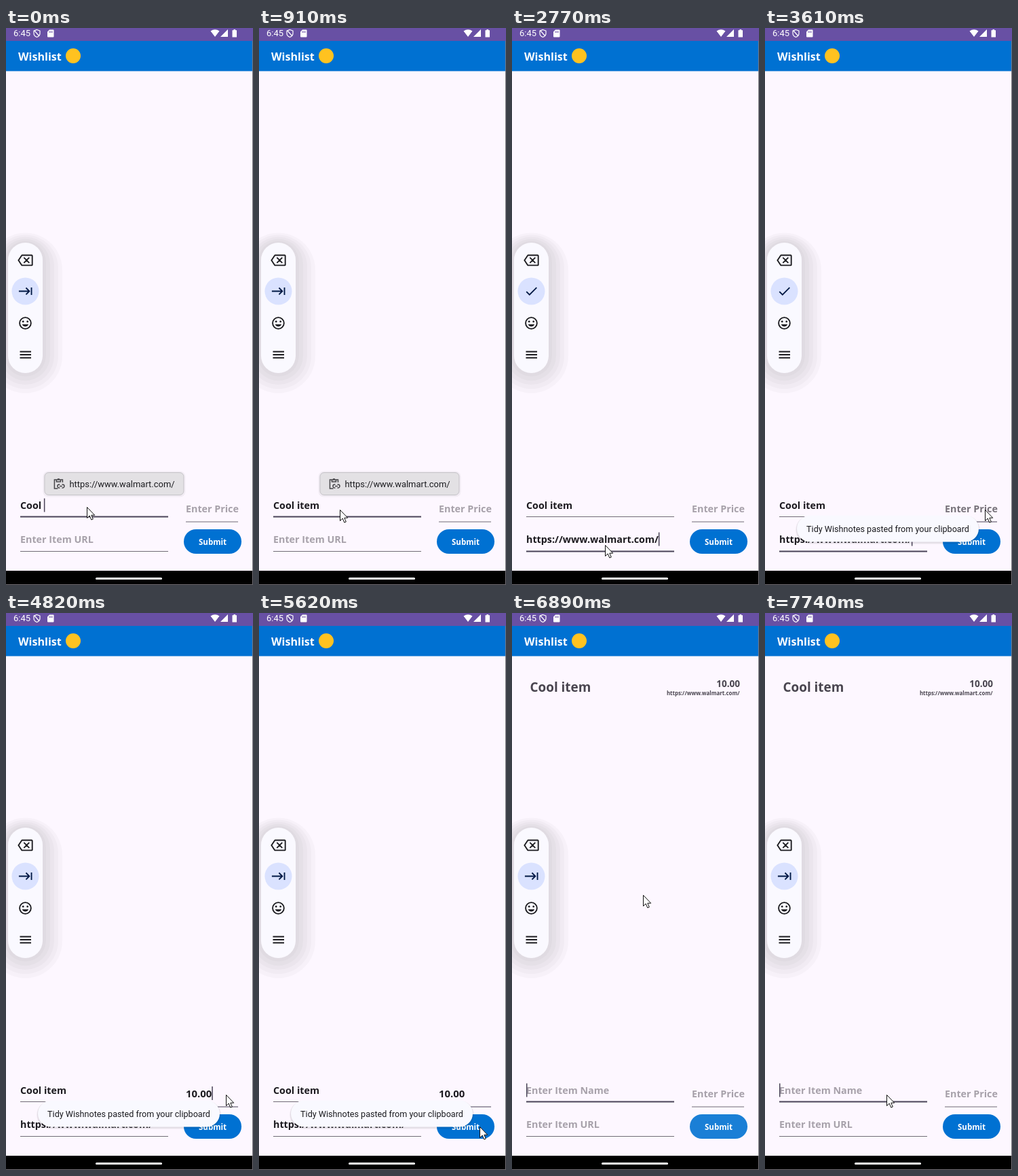
These frames come from a looping animation (364 px wide and 820 px high, 8 s). An HTML page:

```html
<!DOCTYPE html>
<html lang="en">
<head>
<meta charset="utf-8">
<title>Wishlist</title>
<style>
  html, body { margin: 0; width: 100%; height: 100%; overflow: hidden; background: #fdf7ff; }
  svg { display: block; width: 364px; height: 820px; }
  text { white-space: pre; }
  .b { font: 700 14.3px "Open Sans", "Noto Sans", sans-serif; }
  .r { font-family: Roboto, sans-serif; }
</style>
</head>
<body>
<svg viewBox="0 0 364 820">
  <rect width="364" height="820" fill="#fdf7ff"/>

  <!-- status and app bars -->
  <rect width="364" height="63.5" fill="#0071d2"/>
  <rect width="364" height="19" fill="#6850a4"/>
  <g fill="#fff">
    <text class="r" x="11" y="12.3" font-size="13">6:45</text>
    <path d="M45.5 2.5L50 4.2V8Q50 11.7 45.5 13.5Q41 11.7 41 8V4.2ZM42 4L49 12" fill="none" stroke="#fff" stroke-width="1.2"/>
    <path d="M64 2.5H69.5Q70.5 2.5 70.5 3.5V12.5Q70.5 13.5 69.5 13.5H62Q61 13.5 61 12.5V5.5Z"/>
    <path d="M64 4.5V7M66 4.5V7M68 4.5V7" stroke="#6850a4"/>
    <path d="M301.5 4.5Q308 .2 314.5 4.5L308 13Z"/>
    <path d="M327 2V13H316Z"/>
    <path d="M333.5 3.2H335.5V2H338V3.2H340V13.5H333.5Z"/>
    <text class="b" x="18" y="47.5" style="font-size:16.1px">Wishlist</text>
  </g>
  <circle cx="99" cy="41" r="11" fill="#ffc220"/>

  <!-- saved item -->
  <g id="card" class="b" fill="#49454f">
    <text x="26.5" y="115.5" style="font-size:18.9px">Cool item</text>
    <text x="336" y="108.5" text-anchor="end" style="font-size:13.5px">10.00</text>
    <text x="335.5" y="121" text-anchor="end" style="font-size:7.9px">https://www.walmart.com/</text>
  </g>

  <!-- floating keyboard bar, icons on a 24 unit grid -->
  <g id="shade" fill-opacity=".022"></g>
  <rect x="3" y="316" width="51" height="192" rx="25.5" fill="#faf9ff"/>
  <circle cx="28.5" cy="387.5" r="20" fill="#dae2ff"/>
  <g fill="none" stroke="#1b1b1f" stroke-width="2">
    <g transform="translate(17.3 330.8) scale(.93)">
      <path d="M7 4H22Q23 4 23 5V19Q23 20 22 20H7Q6.500 20 6.200 19.500L1.200 12L6.200 4.500Q6.500 4 7 4ZM9.700 7.700L18.300 16.300M18.300 7.700L9.700 16.300"/>
    </g>
    <g transform="translate(18 376.300) scale(.93)" stroke="#001945">
      <path id="next" d="M1 12H17M12.300 6.700L17.600 12L12.300 17.300M21 6V18"/>
      <path id="check" d="M3.500 12.700L8.400 17.600L19.700 6.300"/>
    </g>
    <g transform="translate(17.300 423.300) scale(.93)">
      <circle cx="12" cy="12" r="9"/>
      <path d="M6.900 14H17.100Q15.500 17.500 12 17.500T6.900 14ZM8.500 8V11M15.500 8V11" fill="#1b1b1f" stroke="none"/>
      <path d="M8.500 9.500h0M15.500 9.500h0" stroke-width="3" stroke-linecap="round"/>
    </g>
    <path d="M20.500 476.500H37M20.500 481H37M20.500 485.500H37" stroke-width="1.800"/>
  </g>

  <!-- form -->
  <g id="form" class="b"></g>
  <rect id="caret" width="1.5" height="20" fill="#4a4458"/>
  <rect id="button" x="262" y="738" width="85" height="36" rx="18"/>
  <text class="b" x="304.5" y="760.5" text-anchor="middle" fill="#fff" style="font-size:11.5px">Submit</text>

  <!-- paste suggestion, placed relative to the caret -->
  <g id="chip">
    <rect x="-2" y="652.5" width="210" height="38" rx="8" fill-opacity=".045"/>
    <rect x=".5" y="654.5" width="205" height="33" rx="6" fill="#e3e1e4" stroke="#c5c3c8"/>
    <path d="M20 678H15V665H27V669M18 665V668H24V665M19.5 664H22.5M23 672H22A2.5 2.5 0 0 0 22 677H23M26 672H27A2.5 2.5 0 0 1 27 677H26M22.5 674.5H26.5"
      fill="none" stroke="#47464a" stroke-width="1.5"/>
    <text class="r" x="37" y="676" font-size="12.95" fill="#1b1b1f">https://www.walmart.com/</text>
  </g>

  <!-- clipboard notice -->
  <g id="toast">
    <rect x="45" y="718" width="272" height="42" rx="21" fill-opacity=".04"/>
    <rect x="46" y="718" width="270" height="40.5" rx="20" fill-opacity=".07"/>
    <rect x="47" y="717.5" width="268" height="39" rx="19.5" fill="#f9f9ff"/>
    <text class="r" x="181" y="741.5" text-anchor="middle" font-size="12.6" fill="#1b1b1f">Tidy Wishnotes pasted from your clipboard</text>
  </g>

  <path id="mouse" d="M.5 .5V16.5L4.2 13L6.8 19L9.3 18L6.8 12.2H11.7Z" fill="#fff" stroke="#111"/>

  <rect y="799" width="364" height="21"/>
  <rect x="132" y="809" width="98" height="3" rx="1.5" fill="#fff"/>
  <path d="M363.5 19V819.5H0" fill="none" stroke="#77747b"/>
</svg>
<script>
const LOOP = 8000, BLINK = 500, SUBMIT = 6020;
const $ = id => document.getElementById(id);
const set = (el, attrs) => { for (const k in attrs) el.setAttribute(k, attrs[k]); };
const make = (parent, tag, attrs) => {
  const el = document.createElementNS(parent.namespaceURI, tag);
  set(el, attrs);
  return parent.appendChild(el);
};
const clamp = (v, lo = 0, hi = 1) => Math.min(hi, Math.max(lo, v));
const ramp = (t, start, length) => clamp((t - start) / length);
const ease = p => p * p * (3 - 2 * p);

// Soft shadow: stacked outlines that spread further below than above.
for (let s = 5; s <= 29; s += 6)
  make($('shade'), 'rect', {
    x: 3 - s, y: 316 - s / 2, width: 51 + 2 * s, height: 192 + 1.52 * s, rx: 25.5 + s
  });

// Typing begins at `start` with `given` letters and adds one every `step` ms.
const fields = [
  { x: 21, end: 239, base: 708, line: 719.5, thick: 2, size: 14.3,
    hint: 'Enter Item Name', text: 'Cool item', given: 5, start: 0, step: 102 },
  { x: 21, end: 239, base: 758, line: 770.5, thick: 2, size: 14.3,
    hint: 'Enter Item URL', text: 'https://www.walmart.com/', given: 0, start: 2580, step: 1 },
  { x: 265, end: 342, base: 712.5, line: 727, thick: 1.2, size: 14.9,
    hint: 'Enter Price', text: '10.00', given: 0, start: 3945, step: 175 }
];
for (const f of fields) {
  f.done = f.start + f.step * (f.text.length - f.given);
  f.label = make($('form'), 'text', { x: f.x, y: f.base });
  f.rule = make($('form'), 'path', { d: `M${f.x} ${f.line}H${f.end}` });
}

const focus = [
  { start: 0, field: 0 }, { start: 1300, field: 1 },
  { start: 3730, field: 2 }, { start: 6690, field: 0 }
];
const moves = [
  { start: 840, time: 310, to: [119, 738] },
  { start: 1480, time: 450, to: [164, 691] },
  { start: 1960, time: 240, to: [137, 761] },
  { start: 3100, time: 360, to: [324, 709] },
  { start: 5300, time: 320, to: [325, 756] },
  { start: 5950, time: 310, to: [185, 709] },
  { start: 6380, time: 510, to: [193, 415] },
  { start: 6890, time: 150, to: [179, 709] }
];

function mouseAt(t) {
  let p = [119, 705];
  for (const m of moves) {
    const k = ease(ramp(t, m.start, m.time));
    p = p.map((v, i) => v + (m.to[i] - v) * k);
  }
  return p.map(Math.round);
}

function typed(f, t) {
  if (t >= SUBMIT) return '';
  return f.text.slice(0, Math.max(0, f.given + Math.floor((t - f.start) / f.step)));
}

function draw(t) {
  const current = focus.findLast(f => f.start <= t);
  const active = fields[current.field];
  const mouse = mouseAt(t);

  for (const f of fields) {
    const value = typed(f, t);
    const on = f === active;
    const hover = mouse[0] > f.x && mouse[0] < f.end && f === fields[2];
    f.label.textContent = value || f.hint;
    f.label.style.fontSize = (value ? f.size : 14.3) + 'px';
    set(f.label, { fill: value ? '#1d1b20' : hover ? '#77727a' : '#a7a1aa' });
    set(f.rule, { stroke: on || hover ? '#4a4458' : '#716d76', 'stroke-width': on ? f.thick : 1.1 });
    f.caretX = f.x + (value ? f.label.getComputedTextLength() : 0);
  }

  // The caret stays lit while typing, then blinks from the last key or focus.
  const key = t < active.start ? 0 : Math.min(t, active.done);
  const idle = t - Math.max(current.start, key);
  set($('caret'), { x: active.caretX, y: active.base - 15.5, opacity: idle % (2 * BLINK) < BLINK ? 1 : 0 });

  set($('chip'), { transform: `translate(${fields[0].caretX + .5})`, opacity: 1 - ramp(t, 1300, 270) });
  set($('toast'), { opacity: ramp(t, 2800, 240) - ramp(t, 6650, 240) });
  set($('card'), { opacity: +(t >= SUBMIT) });
  set($('button'), { fill: t >= 5900 && t < 7040 ? '#1a7fd6' : '#0071d2' });

  const last = t >= 1690 && t < 3730;
  set($('check'), { opacity: +last });
  set($('next'), { opacity: +!last });
  set($('mouse'), { transform: `translate(${mouse})` });
}

function tick() {
  draw(performance.now() % LOOP);
  requestAnimationFrame(tick);
}
tick();
</script>
</body>
</html>
```
